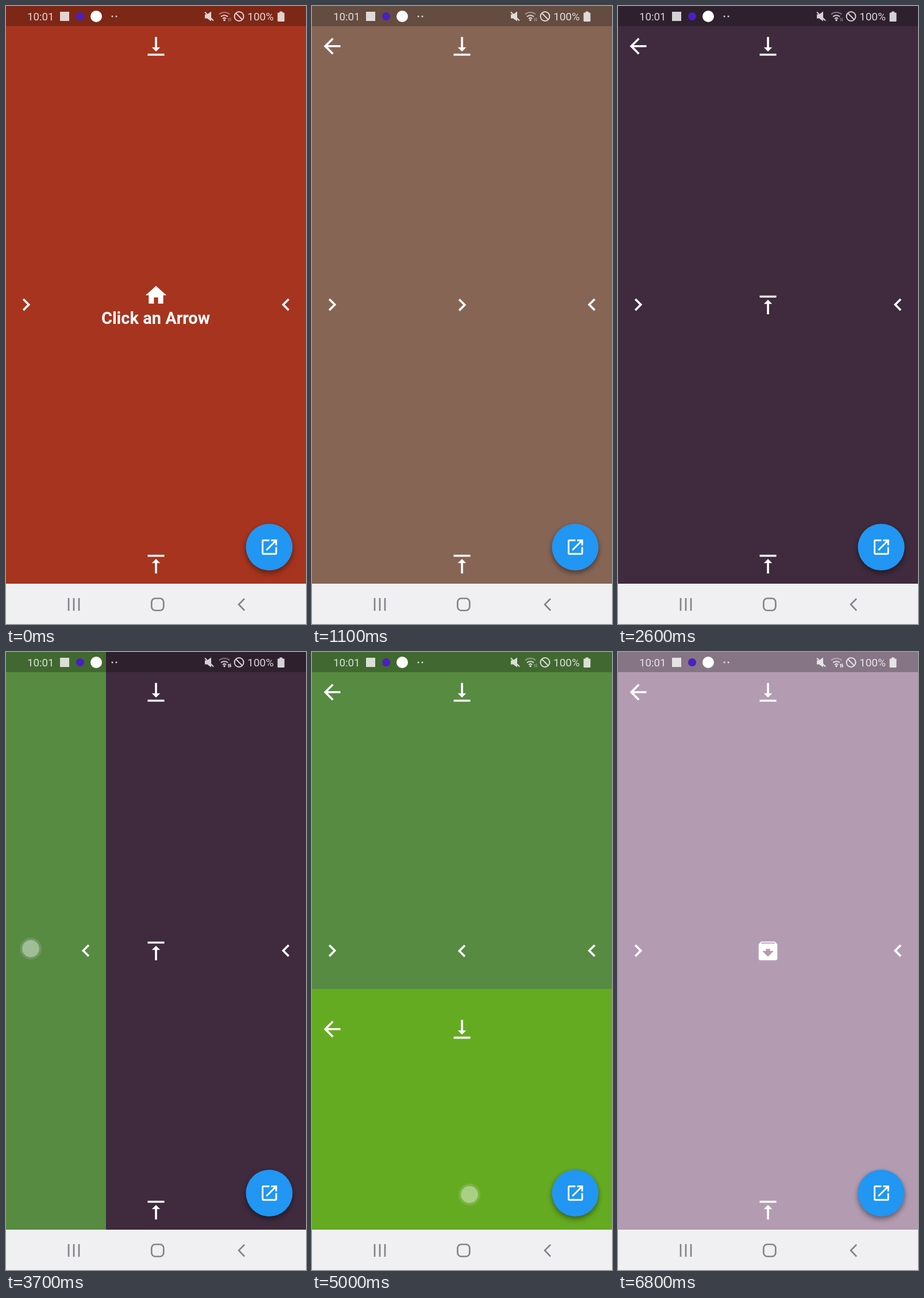
An HTML page that plays this animation: 522 by 1073 pixels, repeating every 8 s.

```html
<!DOCTYPE html>
<html lang="en">
<head>
<meta charset="utf-8">
<title>Page transitions</title>
<style>
  html, body { margin: 0; width: 522px; height: 1073px; overflow: hidden; }
  svg { display: block; font-family: Roboto, sans-serif; }
  .fab { fill: #2196f3; filter: drop-shadow(0 5px 5px rgba(0,0,0,.32)) drop-shadow(0 1px 3px rgba(0,0,0,.16)); }
  .line { fill: none; stroke: #fff; stroke-width: 2; }
  .nav { fill: none; stroke: #838388; stroke-width: 2.7; }
</style>
</head>
<body>
<svg width="522" height="1073" viewBox="0 0 522 1073">
  <g id="pages"></g>
  <circle class="fab" cx="458" cy="939.5" r="40.6"/>
  <g id="fabIcon"></g>

  <rect width="522" height="35" fill-opacity=".25"/>
  <g fill="#fff" opacity=".8" font-size="18.7">
    <text x="37" y="25">10:01</text>
    <rect x="94" y="10" width="16" height="16"/>
    <circle cx="185" cy="18" r="1.5"/><circle cx="192" cy="18" r="1.5"/>
    <path d="M346 14.500h4l7-5v17l-7-5h-4z"/>
    <path class="line" d="M346 10.500l15 15"/>
    <path class="line" d="M377 22a4.500 4.500 0 0 1 6 0M374 18.500a9 9 0 0 1 12 0"/>
    <path class="line" opacity=".5" d="M371 14.500a13.500 13.500 0 0 1 18 0"/>
    <circle cx="380" cy="24.500" r="1.800"/>
    <path id="traffic" d="M385.500 23l2-3 2 3h-1.200v4h-1.600v-4zM388.500 24l2 3 2-3h-1.200v-4h-1.600v4z"/>
    <circle class="line" cx="405.500" cy="18" r="8"/>
    <path class="line" d="M400 12.500l11 11"/>
    <text x="420" y="25" font-size="19">100%</text>
    <path d="M476 9.500h5v2h2.500q1 0 1 1v13.500q0 1-1 1h-10q-1 0-1-1V12.500q0-1 1-1h2.500z"/>
  </g>
  <circle cx="129" cy="18" r="7" fill="#4a1fc4"/>
  <circle cx="157" cy="18" r="10" fill="#fff"/>

  <rect y="1003" width="522" height="70" fill="#f0f0f2"/>
  <path class="nav" d="M109 1028v22M118 1028v22M127 1028v22M415 1029l-10 10 10 10.500"/>
  <rect class="nav" x="253.300" y="1028.500" width="21" height="21" rx="6.500"/>

  <g id="touch" fill="#fff">
    <circle r="19" fill-opacity=".22"/>
    <circle r="15" fill-opacity=".75" stroke="#b4b6d8" stroke-opacity=".5"/>
  </g>
</svg>
<script>
const W = 522, H = 1003, LOOP = 8000, STEP = 100;

const ICONS = {
  right: 'M10 6L8.590 7.410 13.170 12l-4.580 4.590L10 18l6-6z',
  left: 'M15.410 7.410L14 6l-6 6 6 6 1.410-1.410L10.830 12z',
  down: 'M16 13h-3V3h-2v10H8l4 4zM4 19v2h16v-2z',
  up: 'M8 11h3v10h2V11h3l-4-4zM4 3v2h16V3z',
  back: 'M20 11H7.830l5.590-5.590L12 4l-8 8 8 8 1.410-1.410L7.830 13H20z',
  home: 'M10 20v-6h4v6h5v-8h3L12 3 2 12h3v8z',
  open: 'M19 19H5V5h7V3H5q-2 0-2 2v14q0 2 2 2h14q2 0 2-2v-7h-2zM14 3v2h3.590l-9.830 9.830 1.410 1.410L19 6.410V10h2V3z',
  archive: 'M20.540 5.230l-1.390-1.680Q18.700 3 18 3H6q-.700 0-1.160.550L3.460 5.230Q3 5.800 3 6.500V19q0 2 2 2h14q2 0 2-2V6.500q0-.700-.460-1.270zM12 17.500L6.500 12H10v-2h4v2h3.500zM5.120 5l.810-1h12l.940 1z'
};

// from: side the page enters from; null means it fades in
const PAGES = [
  { color: '#a7341e', icon: 'home' },
  { color: '#876555', icon: 'right', from: [1, 0], tap: 700, start: 850, span: 200, at: [498, 505] },
  { color: '#3f2b3d', icon: 'up', from: [0, -1], tap: 2200, start: 2333.33, span: 200, at: [265, 92] },
  { color: '#568b41', icon: 'left', from: [-1, 0], tap: 3500, start: 3633.33, span: 200, at: [43, 515] },
  { color: '#65ab22', icon: 'down', from: [0, 1], tap: 4800, start: 4916.67, span: 200, at: [274, 942] },
  { color: '#b39cb1', icon: 'archive', from: null, tap: 6300, start: 6450, span: 300, at: [464, 934] }
];

const $ = id => document.getElementById(id);

const icon = (name, x, y, scale = 1.8125) =>
  `<path fill="#fff" fill-rule="evenodd" d="${ICONS[name]}" transform="translate(${x} ${y}) scale(${scale}) translate(-12 -12)"/>`;

const pageMarkup = ({ color, icon: center }) => {
  const isHome = center === 'home';
  return `<g><rect width="${W}" height="${H}" fill="${color}"/>` +
    icon('down', 261, 70) + icon('up', 261, 969) +
    icon('right', 35, 518.5) + icon('left', 487, 518.5) +
    icon(center, 261, isHome ? 502.3 : 519) +
    (isHome
      ? '<text x="260.5" y="552" font-size="29" font-weight="700" text-anchor="middle" fill="#fff">Click an Arrow</text>'
      : icon('back', 35, 69.7)) + '</g>';
};

$('pages').innerHTML = PAGES.map(pageMarkup).join('');
$('fabIcon').innerHTML = icon('open', 458.3, 939.5, 1.48);
const layers = [...$('pages').children];

function render(time) {
  let touch = null;
  PAGES.forEach((page, i) => {
    if (!i) return;
    const progress = Math.min(1, Math.max(0, (time - page.start) / page.span));
    const layer = layers[i];
    layer.style.display = progress ? '' : 'none';
    if (page.from) {
      const [dx, dy] = page.from.map(side => side * (1 - progress));
      layer.setAttribute('transform', `translate(${dx * W} ${dy * H})`);
    } else {
      layer.setAttribute('opacity', progress);
    }
    if (time >= page.tap && time < page.tap + 300) touch = page;
  });

  $('touch').style.display = touch ? '' : 'none';
  if (touch) {
    $('touch').setAttribute('transform', `translate(${touch.at})`);
    $('touch').setAttribute('opacity', time < touch.tap + 200 ? .85 : .55);
  }
  const busy = (time >= 3200 && time < 4100) || time >= 5200;
  $('traffic').setAttribute('opacity', busy ? 1 : .35);
}

function tick() {
  render(Math.floor(performance.now() % LOOP / STEP) * STEP);
  requestAnimationFrame(tick);
}
tick();
</script>
</body>
</html>
```
